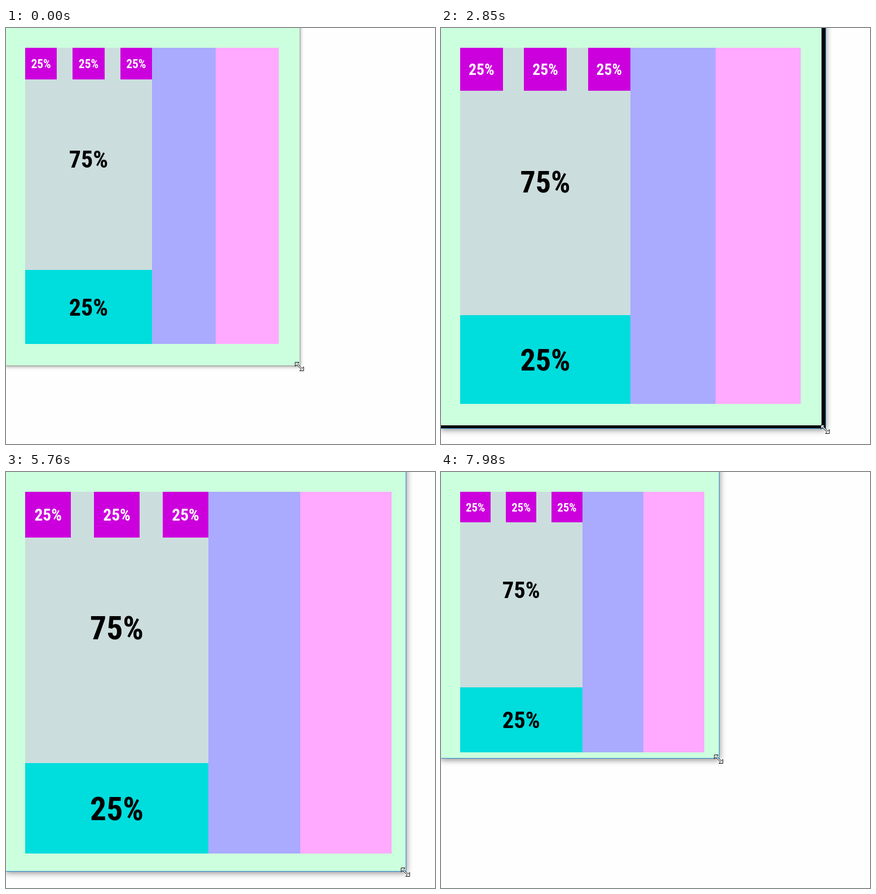
These frames come from a looping animation (761 px wide and 736 px high, 8000 ms). An HTML page:

```html
<!DOCTYPE html>
<html lang="en">
<head>
<meta charset="utf-8">
<title>Proportional boxes in a resized window</title>
<style>
  html, body { margin: 0; width: 100%; height: 100%; overflow: hidden; background: #fefefe; }
  svg { display: block; width: 100vw; height: 100vh; }
  rect { shape-rendering: crispEdges; }
  #shadow { shape-rendering: auto; }
  text {
    font: 700 100px "Roboto Condensed", Roboto, sans-serif;
    font-stretch: 75%;
    text-anchor: middle;
  }
</style>
</head>
<body>
<svg id="stage" viewBox="0 0 761 736">
  <defs>
    <filter id="soft" filterUnits="userSpaceOnUse" x="-40" y="-40" width="860" height="840">
      <feGaussianBlur id="blur" stdDeviation="6"/>
    </filter>
    <clipPath id="frame"><rect id="clip"/></clipPath>
  </defs>
  <rect id="shadow" filter="url(#soft)"/>
  <g id="view" clip-path="url(#frame)"></g>
  <rect id="border" fill="none" stroke-width="1"/>
  <path id="cursor" fill="#fff" stroke="#000" stroke-width="1"
    d="M-7.5-7.5H-.5L-3.2-4.8 4.8 3.2 7.5.5V7.5H.5L3.2 4.8-4.8-3.2-7.5-.5Z"/>
</svg>
<script>
const LOOP = 8000, STEP = 190 / 3;
const LEFT = 34, TOP = 35, MARGIN_X = 37, MARGIN_Y = 38;
const $ = id => document.getElementById(id);
const view = $("view");

// Stops of the dragged corner: width, height, step of arrival, step of leaving.
const stops = [
  [521, 597, 0, 14], [557, 625, 22], [610, 663, 23], [632, 683, 24, 30],
  [644, 686, 33], [653, 687, 35], [675, 703, 41, 44], [714, 731, 50, 52],
  [722, 737, 53, 54], [729, 739, 55], [758, 733, 69, 83], [697, 699, 93, 98],
  [694.5, 689, 100], [648, 661, 102], [583, 619, 113, 117], [504, 534, 124], [493, 506, 126]
].map(([w, h, arrive, leave = arrive]) => ({ w, h, arrive, leave }));

const mix = (a, b, k) => a + (b - a) * k;

function sizeAt(n) {
  const i = Math.max(0, stops.findLastIndex(stop => stop.arrive <= n));
  const a = stops[i], b = stops[i + 1];
  if (!b || n <= a.leave) return [a.w, a.h];
  const k = (n - a.leave) / (b.arrive - a.leave);
  return [mix(a.w, b.w, k), mix(a.h, b.h, k)];
}

function set(el, attrs) {
  for (const name in attrs) el.setAttribute(name, attrs[name]);
}

function add(tag, fill) {
  const el = document.createElementNS("http://www.w3.org/2000/svg", tag);
  el.setAttribute("fill", fill);
  return view.appendChild(el);
}

// Places a rectangle by its edges, snapped to whole pixels.
function box(el, x0, y0, x1, y1) {
  const x = Math.round(x0), y = Math.round(y0);
  set(el, { x, y, width: Math.max(0, Math.round(x1) - x), height: Math.max(0, Math.round(y1) - y) });
}

function label(words, fill) {
  const el = add("text", fill);
  el.textContent = words;
  return el;
}

const unpainted = add("rect", "#000");
const surface = add("rect", "#fff");
const page = add("rect", "#ccffdd");
const upper = add("rect", "#ccdddd");
const lower = add("rect", "#00dddd");
const middle = add("rect", "#aaaaff");
const right = add("rect", "#ffaaff");
const upperText = label("75%", "#000");
const lowerText = label("25%", "#000");
const tiles = [0, 1, 2].map(() => ({ rect: add("rect", "#cc00dd"), text: label("25%", "#fff") }));

// Condense the regular-width face when no narrow face is available.
const narrow = upperText.getComputedTextLength() > 175 ? 0.88 : 1;

function placeText(el, x, y, size) {
  const s = size / 100;
  const baseline = Math.round(y + size * 0.365);
  set(el, { transform: `translate(${x} ${baseline}) scale(${s * narrow} ${s})` });
}

function drawPage(w, h) {
  const x1 = w - MARGIN_X, y1 = h - MARGIN_Y;
  const wide = x1 - LEFT, half = LEFT + wide / 2, threeQuarters = LEFT + wide * 0.75;
  const split = Math.ceil(mix(TOP, y1, 0.75));
  const size = 6.9 + wide * 0.078, tile = wide / 8, centre = LEFT + wide / 4;

  box(page, 0, 0, w, h);
  box(upper, LEFT, TOP, half, split);
  box(lower, LEFT, split, half, y1);
  box(middle, half, TOP, threeQuarters, y1);
  box(right, threeQuarters, TOP, x1, y1);
  placeText(upperText, centre, (TOP + split) / 2, size);
  placeText(lowerText, centre, (split + y1) / 2, size);
  tiles.forEach(({ rect, text }, i) => {
    const x = LEFT + i * tile * 1.5;
    box(rect, x, TOP, x + tile, TOP + tile);
    placeText(text, x + tile / 2, TOP + tile / 2, size * 0.51);
  });
}

function drawWindow(w, h, active) {
  box($("clip"), 0, 0, w, h);
  box(unpainted, 0, 0, w, h);
  set($("border"), {
    x: -2.5, y: -10.5, width: Math.round(w) + 3, height: Math.round(h) + 11,
    stroke: active ? "#2b88d2" : "#98a39c"
  });
  set($("blur"), { stdDeviation: active ? 6 : 3 });
  set($("shadow"), {
    x: -1, y: -20, width: w + 2, height: h + (active ? 23 : 22),
    "fill-opacity": active ? 0.5 : 0.4
  });
  set($("cursor"), { transform: `translate(${Math.round(w) - 0.5} ${Math.round(h) + 2})` });
}

function draw(time) {
  const n = Math.floor((time % LOOP + 12) / STEP);
  const [w, h] = sizeAt(n);
  const [lastW, lastH] = sizeAt(n - 1);
  // While the corner moves, painting trails it by one step and layout by two.
  const moving = w !== lastW || h !== lastH;
  drawWindow(w, h, n > 8);
  box(surface, 0, 0, lastW, lastH);
  drawPage(...sizeAt(moving ? n - 2 : n));
}

const start = performance.now();
function tick() {
  draw(performance.now() - start);
  requestAnimationFrame(tick);
}
tick();
</script>
</body>
</html>
```
